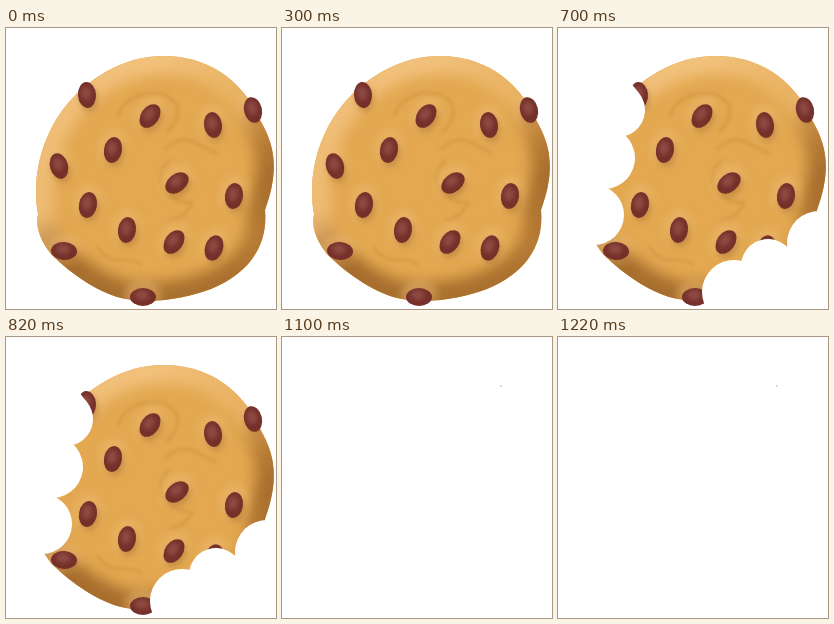
Write an HTML page with a canvas that moves like this. It is 270x281 px and loops after 1.3 s.

```html
<!DOCTYPE html>
<html lang="en">
<head>
<meta charset="utf-8">
<title>Cookie</title>
<style>
  html, body { margin: 0; width: 100%; height: 100%; overflow: hidden; background: #fff; }
  canvas { display: block; }
</style>
</head>
<body>
<canvas id="stage" width="270" height="281"></canvas>
<script>
const W = 270, H = 281, LOOP = 1300, GONE = 1100;
const stage = document.getElementById('stage').getContext('2d');

const outline = new Path2D(`M156 28C195 27 235 47 254 92C271 120 272 146 259 182
  C262 215 246 244 205 261C180 270 150 276 120 271C95 267 65 246 45 226
  C35 213 29 200 32 186C25 150 35 96 77 60C98 42 126 28 156 28Z`);

const folds = new Path2D(`M112 88Q118 70 139 66T170 76Q176 90 160 105
  M158 122Q174 106 192 116T211 124M164 132Q149 146 158 160T186 175Q179 190 163 192
  M91 218Q100 233 116 232T136 238`);

// x, y, tilt in degrees
const chips = [
  [81, 67, -4], [144, 88, 35], [107, 122, 10], [207, 97, -8], [247, 82, -12],
  [53, 138, -16], [82, 177, 10], [171, 155, 52], [228, 168, 8], [121, 202, 8],
  [168, 214, 35], [208, 220, 18], [58, 223, 93], [137, 269, 90]
];

// Tooth marks as x, y, radius
const bites = [
  { at: 500, teeth: [[176, 264, 32], [210, 238, 27], [261, 215, 32]] },
  { at: 700, teeth: [[60, 82, 27], [46, 130, 31], [36, 187, 30]] },
  { at: 900, teeth: [[190, 50, 31], [220, 80, 31], [239, 113, 30]] }
];

function oval(c, x, y, rx, ry, tilt, fill, blur = 0) {
  c.filter = blur ? `blur(${blur}px)` : 'none';
  c.fillStyle = fill;
  c.beginPath();
  c.ellipse(x, y, rx, ry, tilt * Math.PI / 180, 0, 7);
  c.fill();
}

function trace(c, path, color, width, blur) {
  c.filter = `blur(${blur}px)`;
  c.strokeStyle = color;
  c.lineWidth = width;
  c.stroke(path);
}

// Browned from the right round to the lower left, pale from the left over the top
function crust(c) {
  const shade = c.createConicGradient(0, 148, 150);
  const stops = [[0, '#a66d2d'], [.09, '#b67b35'], [.14, '#ab712f'], [.38, '#a66d2d'],
    [.45, '#eebb74'], [.75, '#f1c17c'], [.88, '#e9b262'], [.95, '#b67b35'], [1, '#a66d2d']];
  stops.forEach(stop => shade.addColorStop(...stop));
  return shade;
}

function bakeCookie() {
  const canvas = document.createElement('canvas');
  canvas.width = W;
  canvas.height = H;
  const c = canvas.getContext('2d');

  c.save();
  c.clip(outline);
  c.fillStyle = '#e3a850';
  c.fillRect(0, 0, W, H);
  trace(c, outline, crust(c), 36, 7);
  trace(c, folds, 'rgba(187,126,48,.28)', 3, 1.5);
  for (const [x, y, tilt] of chips) {
    oval(c, x, y - 2, 14, 18, tilt, 'rgba(240,192,122,.5)', 4);
    oval(c, x + 2, y + 4, 9, 13, tilt, 'rgba(166,104,36,.5)', 3);
  }
  c.restore();

  for (const [x, y, tilt] of chips) {
    oval(c, x, y, 9, 13, tilt, '#76302a', .6);
    oval(c, x - 1, y - 2, 5, 7, tilt, 'rgba(165,100,92,.5)', 2);
  }
  return canvas;
}

// Each tooth sweeps from its mark outwards past the rim
function cut({ teeth }) {
  stage.strokeStyle = '#fff';
  stage.lineCap = 'round';
  for (const [x, y, r] of teeth) {
    const a = Math.atan2(y - 190, x - 148);
    stage.lineWidth = 2 * r;
    stage.beginPath();
    stage.moveTo(x, y);
    stage.lineTo(x + 90 * Math.cos(a), y + 90 * Math.sin(a));
    stage.stroke();
  }
}

const cookie = bakeCookie();

function draw(now) {
  const t = now % LOOP;
  stage.fillStyle = '#fff';
  stage.fillRect(0, 0, W, H);
  if (t < GONE) {
    stage.drawImage(cookie, 0, 0);
    bites.filter(bite => t >= bite.at).forEach(cut);
  }
  if (t >= 500) oval(stage, 242, 238, .6, .6, 0, '#e8e8e8');
  if (t >= 900) oval(stage, 219, 49, 1, 1, 0, '#ccc');
  requestAnimationFrame(draw);
}

draw(0);
</script>
</body>
</html>
```
